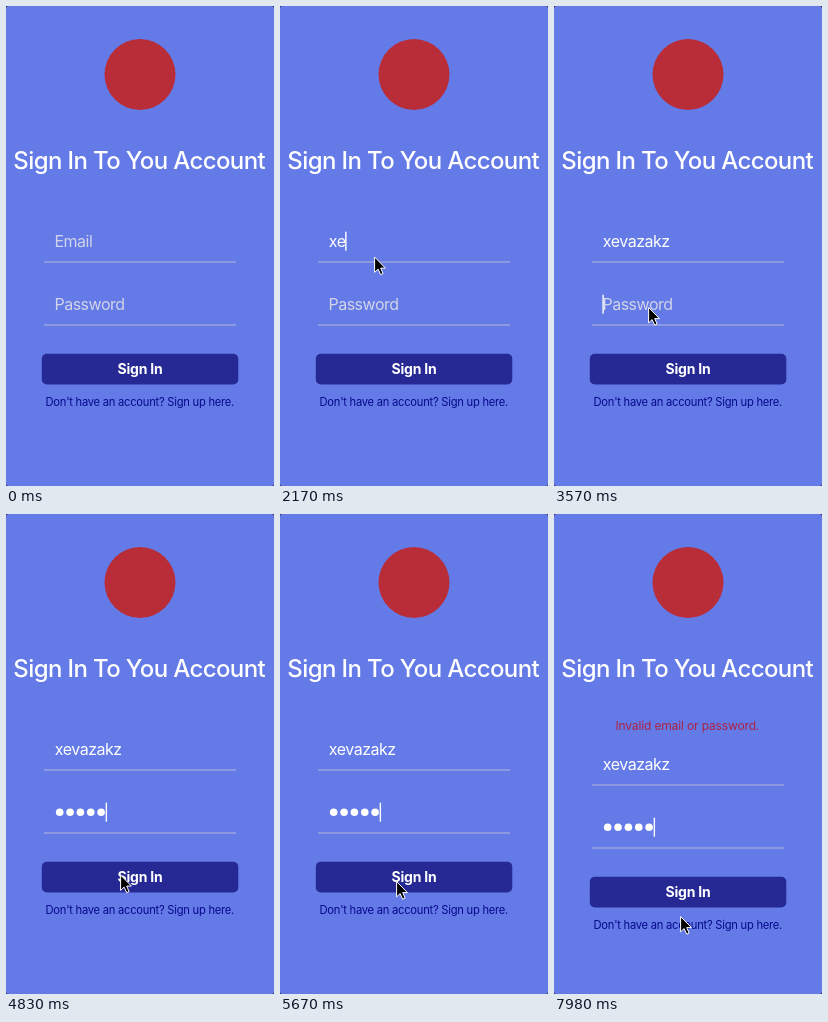
An HTML page that plays this animation: 268 by 480 pixels, repeating every 8 s.

```html
<!DOCTYPE html>
<html lang="en">
<head>
<meta charset="utf-8">
<title>Sign in</title>
<style>
  html, body { margin: 0; width: 100%; height: 100%; overflow: hidden; background: #20264f; }
  svg { display: block; width: 100%; height: 100%; }
  text { font-family: Inter, Roboto, sans-serif; }
  .title { font-size: 24px; font-weight: 500; letter-spacing: -.62px; fill: #fff; }
  .field { font-size: 16px; letter-spacing: -.48px; fill: #fff; }
  .hint { fill: #d2d4e8; }
  .button { font-size: 14px; font-weight: 700; letter-spacing: -.2px; fill: #fff; }
  .link { font-size: 11.2px; letter-spacing: -.25px; fill: #070a8c; }
  .error { font-size: 12px; letter-spacing: -.14px; fill: #ad2345; }
  .mid { text-anchor: middle; }
</style>
</head>
<body>
<svg viewBox="0 0 268 480">
  <rect width="268" height="480" rx="2.5" fill="#647ae7"/>
  <circle cx="134" cy="68.5" r="35.5" fill="#b82d38"/>
  <text class="title mid" x="133.2" y="162.5">Sign In To You Account</text>
  <text class="error mid" id="error" x="133.3" y="216">Invalid email or password.</text>
  <g id="form">
    <text class="field hint" id="emailHint" x="48.4" y="241">Email</text>
    <text class="field" id="email" x="48.8" y="241"></text>
    <path d="M38 256H230M38 319H230" stroke="#b2b6dc"/>
    <text class="field hint" id="passHint" x="48.4" y="304">Password</text>
    <g id="dots" fill="#fff"></g>
    <rect id="caret" width="1.4" height="19" fill="#fff"/>
    <g id="button">
      <rect x="35.8" y="347.7" width="196.5" height="30.8" rx="5" fill="#262994"/>
      <text class="button mid" x="134" y="368">Sign In</text>
    </g>
    <text class="link mid" x="133.8" y="400">Don't have an account? Sign up here.</text>
  </g>
  <path id="cursor" d="M-.4 .5V15.9L3.1 12.6L5.7 18.2L8.1 17L5.7 11.6H10.4Z"
        fill="#000" stroke="#fff" stroke-linejoin="round"/>
</svg>
<script>
const LOOP = 8000;
const NAME = 'xevazakz';
const nameKeys = [1890, 2050, 2240, 2350, 2460, 2570, 2680, 2790];
const passKeys = [3720, 3850, 3980, 4130, 4260];
const EMAIL_FOCUS = 1300, PASS_FOCUS = 3430, PRESS = 5320, ERROR = 6720;

// Pointer stops: time, x, y
const stops = [
  [350, 114, 482], [1050, 91, 242], [1400, 91, 242], [1800, 95, 250.5],
  [2870, 95, 250.5], [3290, 95, 301], [4410, 95, 301], [4800, 115, 360.5],
  [4900, 115, 360.5], [5110, 117, 367], [7420, 117, 367], [7700, 124, 393],
  [7840, 125, 396], [7960, 127, 402]
];

const $ = id => document.getElementById(id);
const clamp = v => Math.min(1, Math.max(0, v));
const ramp = (t, a, b) => clamp((t - a) / (b - a));
const ease = p => p * p * (3 - 2 * p);
const count = (keys, t) => keys.filter(k => t >= k).length;
const show = (id, on) => $(id).setAttribute('visibility', on ? 'visible' : 'hidden');

$('dots').innerHTML = passKeys
  .map((_, i) => `<circle cx="${53.7 + 10.35 * i}" cy="298.2" r="3.8"/>`).join('');

function pointer(t) {
  const i = stops.findIndex(s => t < s[0]);
  if (i < 0) return stops[stops.length - 1].slice(1);
  if (i === 0) return stops[0].slice(1);
  const [t0, x0, y0] = stops[i - 1], [t1, x1, y1] = stops[i];
  const p = ease(ramp(t, t0, t1));
  return [x0 + (x1 - x0) * p, y0 + (y1 - y0) * p];
}

function blink(t, start) {
  if (t < start) return 1;
  const p = (t - start) % 712;
  return 1 - ramp(p, 0, 130) + ramp(p, 340, 380);
}

function caretAlpha(t) {
  if (t < EMAIL_FOCUS) return 0;
  if (t < nameKeys[0]) return blink(t, EMAIL_FOCUS + 350);
  if (t < PASS_FOCUS) return blink(t, 3150);
  return blink(t, 5290);
}

function draw(t) {
  const typed = count(nameKeys, t), dots = count(passKeys, t);
  const inPass = t >= PASS_FOCUS;

  $('email').textContent = NAME.slice(0, typed);
  show('emailHint', !typed);
  show('passHint', !dots);
  [...$('dots').children].forEach((dot, i) => dot.setAttribute('opacity', i < dots ? 1 : 0));

  const nameWidth = typed ? $('email').getComputedTextLength() : 0;
  const caret = $('caret');
  caret.setAttribute('x', 48.4 + (inPass ? 10.25 * dots : nameWidth));
  caret.setAttribute('y', inPass ? 288.7 : 225.7);
  caret.setAttribute('opacity', caretAlpha(t));

  const dip = ramp(t, PRESS, PRESS + 120) - ease(ramp(t, PRESS + 130, PRESS + 370));
  $('button').setAttribute('opacity', 1 - .6 * dip);

  show('error', t >= ERROR);
  $('form').setAttribute('transform', `translate(0 ${t >= ERROR ? 15 : 0})`);

  show('cursor', t >= 350);
  $('cursor').setAttribute('transform', `translate(${pointer(t)})`);
}

const begin = performance.now();
function tick() {
  draw((performance.now() - begin) % LOOP);
  requestAnimationFrame(tick);
}
tick();
</script>
</body>
</html>
```
